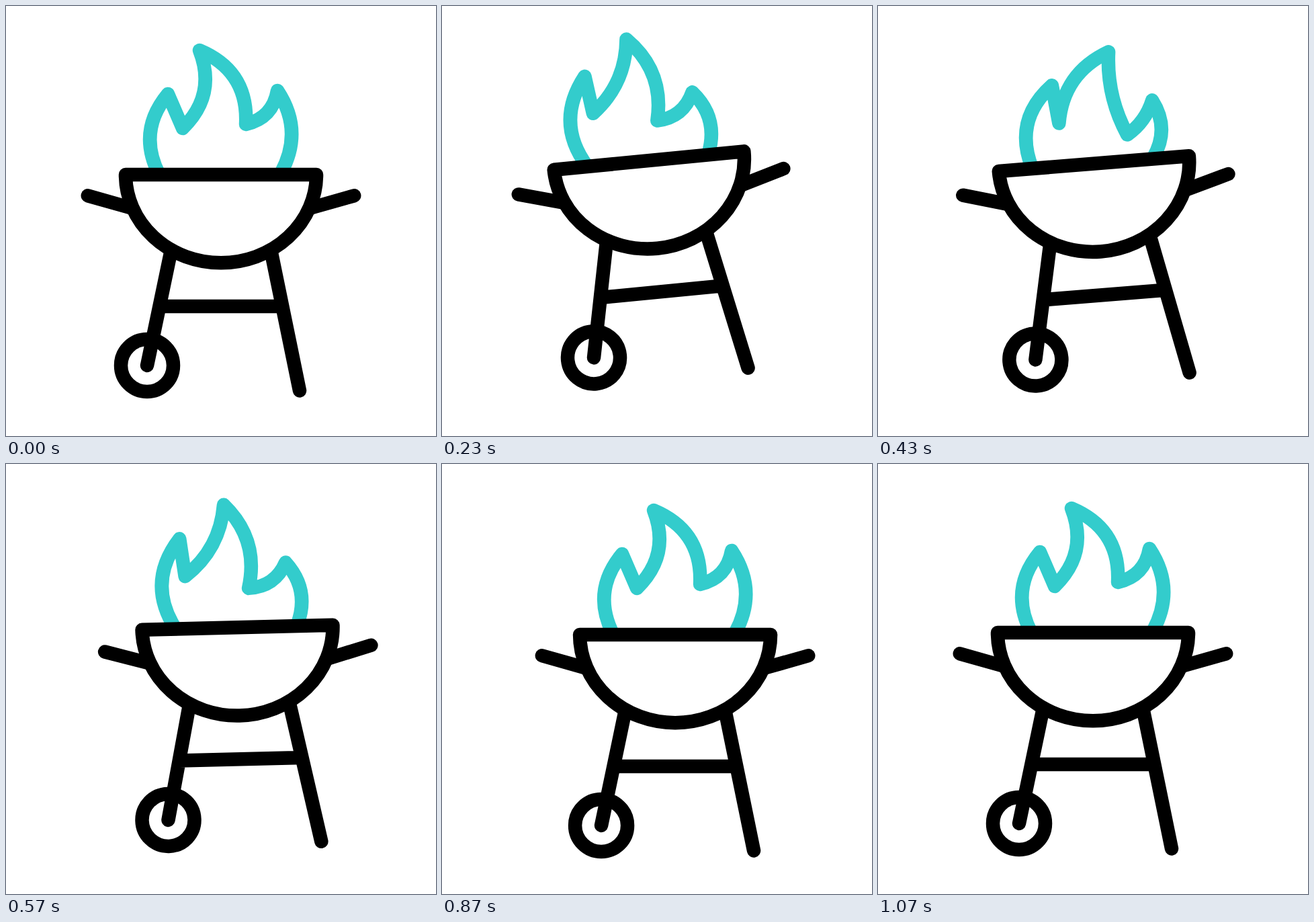
Recreate the animation shown at these times as an HTML page. Size 640 by 640 pixels, loop 1.67 s.

```html
<!DOCTYPE html>
<html>
<head>
<meta charset="utf-8">
<title>Barbecue</title>
<style>
html, body { margin: 0; height: 100%; overflow: hidden; background: #fff; }
svg { display: block; width: 100%; height: 100%; }
path, circle { fill: none; stroke: #000; stroke-width: 20.5; stroke-linecap: round; stroke-linejoin: round; }
#flame { stroke: #3cc; stroke-linecap: butt; }
</style>
</head>
<body>
<svg viewBox="0 0 640 640">
  <g id="grill">
    <path id="flame"/>
    <path d="M178 251H462A142 131.3 0 0 1 178 251Z"/>
    <path d="M121.8 282.3L186 300.5M518.2 282.3L454 300.5"/>
    <path d="M245.3 366L210 535M394.7 366L437 572.5M229 447H411"/>
    <circle cx="210" cy="535" r="39"/>
  </g>
</svg>
<script>
const LOOP = 1670, STEP = 1000 / 30, LAST = 32;
const grill = document.getElementById('grill');
const flame = document.getElementById('flame');

const smooth = u => u * u * (3 - 2 * u);
const accelerate = u => 1 - Math.cos(u * Math.PI / 2);

// Flame corners between its two fixed feet: x, y, bend of the edge leading there
const leftFoot = [228, 251, 0], rightFoot = [409.5, 248, -0.3];
const outline = (...corners) => [leftFoot, ...corners, rightFoot];
const rest = outline([241, 131, -0.33], [263, 182, 0], [288, 66, 0.33], [357, 176, -0.35], [404, 126, 0.33]);
const lean = outline([237, 117, -0.35], [244, 173, 0], [304, 68, 0.22], [338, 193, -0.28], [394, 156, 0.31]);
const curl = outline([267, 130, -0.35], [273, 187, 0], [355, 87, -0.29], [373, 212, 0.14], [414, 164, 0.17]);

// Keys: step, value, easing towards that value (smooth by default)
const xKeys = [[0, 320], [7, 314.7], [20.8, 368.9, accelerate], [LAST, 320]];
const yKeys = [[0, 320], [8, 297.8], [24.5, 323.3], [LAST, 320]];
const tiltKeys = [[0, 0], [9, -6.35], [20.5, 0]];
const flameKeys = [[0, rest], [7, lean], [13, curl], [17, lean], [26, rest]];

function mix(a, b, u) {
  return Array.isArray(a) ? a.map((v, i) => mix(v, b[i], u)) : a + (b - a) * u;
}

function at(keys, k) {
  const next = keys.findIndex(key => key[0] > k);
  if (next < 0) return keys[keys.length - 1][1];
  const [k0, from] = keys[next - 1], [k1, to, ease = smooth] = keys[next];
  return mix(from, to, ease((k - k0) / (k1 - k0)));
}

// Each edge is a quadratic curve bent sideways by a share of its length
function curvePath([[x, y], ...corners]) {
  let d = `M${x} ${y}`;
  for (const [nx, ny, bend] of corners) {
    const cx = (x + nx) / 2 - bend * (ny - y);
    const cy = (y + ny) / 2 + bend * (nx - x);
    d += `Q${cx} ${cy} ${nx} ${ny}`;
    [x, y] = [nx, ny];
  }
  return d;
}

function draw(time) {
  const k = Math.min(LAST, Math.floor((time % LOOP + 3.4) / STEP));
  grill.setAttribute('transform',
    `translate(${at(xKeys, k)} ${at(yKeys, k)}) rotate(${at(tiltKeys, k)}) translate(-320 -320)`);
  flame.setAttribute('d', curvePath(at(flameKeys, k)));
}

const start = performance.now();
function tick() {
  draw(performance.now() - start);
  requestAnimationFrame(tick);
}
tick();
</script>
</body>
</html>
```
